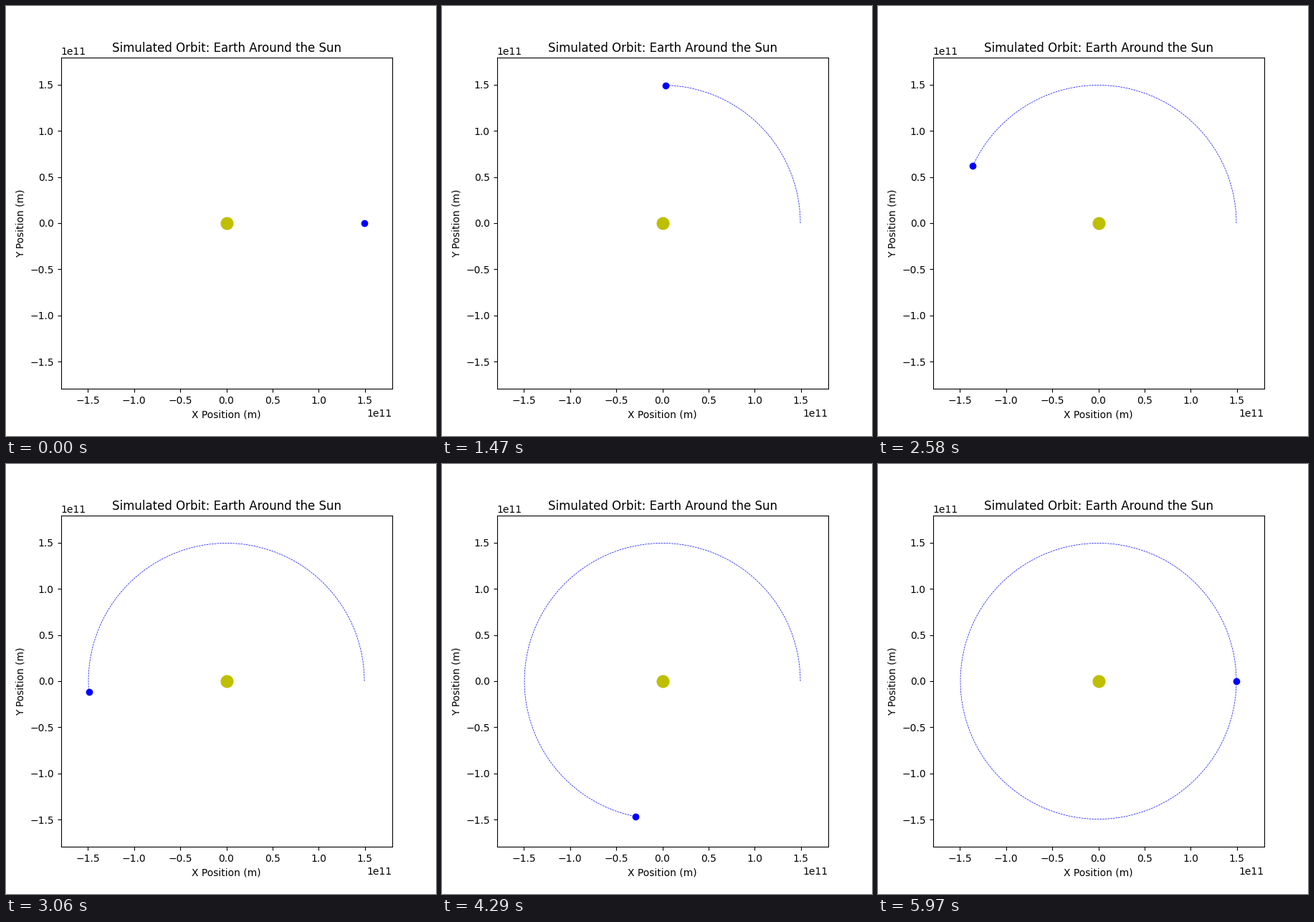
Write a matplotlib script that moves like this. It is 600x600 px and loops after 6000 ms.

```python
import numpy as np
import matplotlib.pyplot as plt
from matplotlib.animation import FuncAnimation

AU = 1.496e11
FRAMES = 200
INTERVAL = 30

theta = np.linspace(0, 2 * np.pi, FRAMES)
x, y = AU * np.cos(theta), AU * np.sin(theta)

fig, ax = plt.subplots(figsize=(6, 6), dpi=100)
ax.set_aspect("equal")
ax.set_xlim(-1.2 * AU, 1.2 * AU)
ax.set_ylim(-1.2 * AU, 1.2 * AU)
ax.set_title("Simulated Orbit: Earth Around the Sun")
ax.set_xlabel("X Position (m)")
ax.set_ylabel("Y Position (m)")

ax.plot(0, 0, "yo", markersize=12)
planet, = ax.plot([], [], "bo", markersize=6)
trail, = ax.plot([], [], "b--", linewidth=0.5)


def update(i):
    planet.set_data([x[i]], [y[i]])
    trail.set_data(x[:i + 1], y[:i + 1])
    return planet, trail


anim = FuncAnimation(fig, update, frames=FRAMES, interval=INTERVAL, repeat=True)
plt.show()
```
